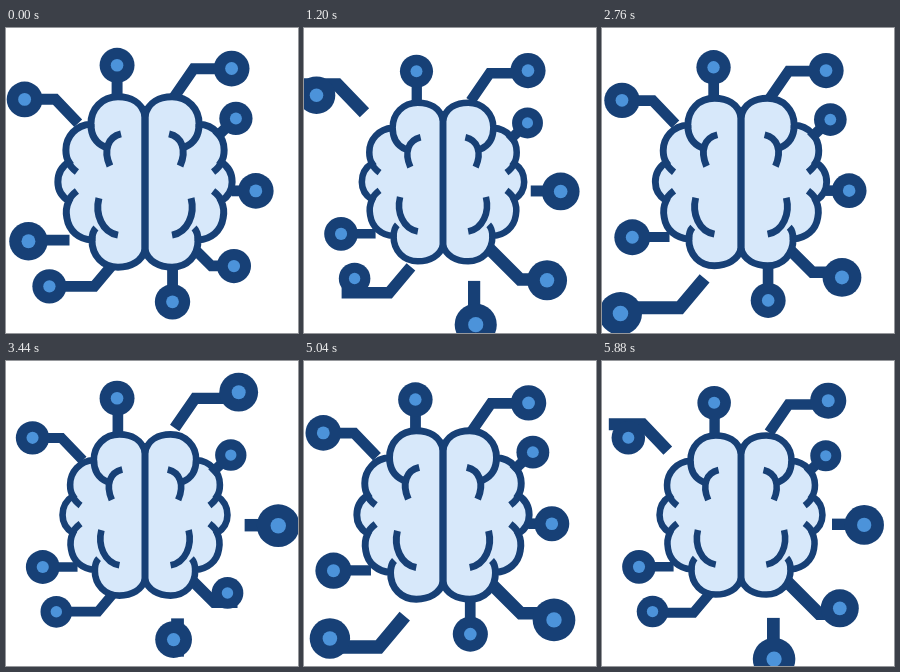
Recreate the animation shown at these times as an HTML page with a canvas. Size 292 by 305 pixels, loop 5.92 s.

```html
<!DOCTYPE html>
<html lang="en">
<head>
<meta charset="utf-8">
<title>Pulsing brain network</title>
<style>
  html, body { margin: 0; width: 100%; height: 100%; overflow: hidden; background: #fff; }
  canvas { display: block; }
</style>
</head>
<body>
<canvas id="stage" width="292" height="305"></canvas>
<script>
const ctx = document.getElementById('stage').getContext('2d');
const DARK = '#174076', MID = '#4c93da', LIGHT = '#d7e8fa';
const LOOP = 5920, CYCLE = 2360;
const LEAD = 55;      // a line moves this much before its disc
const ATTACK = 130;   // time from the start of a pulse to its peak
const BREATH = .036;  // slow swell shared by all parts
const CX = 139, CY = 154;

const brain = { rest: .964, pulses: [[740, .065], [1790, .08]] };

// r: disc radius; line: points from the disc towards the brain, relative to the centre;
// rest: resting scale; pulses: [start, strength]
const nodes = [
  { r: 18, line: [[-121, -83], [-90, -83], [-67, -59]],
    rest: .963, pulses: [[1155, .26], [1815, -.135]] },
  { r: 17.5, line: [[-28, -117], [-28, -84]],
    rest: .96, pulses: [[794, .165], [1790, .08]] },
  { r: 18, line: [[87, -114], [49, -114], [29, -85]],
    rest: .957, pulses: [[850, .23], [1764, .152]] },
  { r: 17, line: [[93, -65], [73, -46]],
    rest: .94, pulses: [[740, .06], [1790, .08]] },
  { r: 18, line: [[112, 9], [88, 9]],
    rest: .945, pulses: [[930, .285], [1890, .125]] },
  { r: 17.5, line: [[91, 86], [68, 86], [38, 56]],
    rest: .94, pulses: [[130, .3], [1090, .245], [1790, .06]] },
  { r: 18, line: [[28, 122], [28, 89]],
    rest: .95, pulses: [[1040, .268], [1815, -.115]] },
  { r: 17.5, line: [[-98, 107], [-52, 107], [-31, 82]],
    rest: .938, pulses: [[255, .275], [1205, .255], [1790, .075]] },
  { r: 19.5, line: [[-118, 60], [-78, 60]],
    rest: .9, pulses: [[1815, -.11], [2080, .12]] }
];
const bent = nodes.filter(n => n.line.length > 2);
const straight = nodes.filter(n => n.line.length === 2);

const lobe = new Path2D(`M139 88 C136 74 124 69 112 69 C96 69 85 81 85 96
  C70 97 60 109 60 122 C60 127 61 131 63 134 C55 139 52 147 52 154
  C52 161 55 168 63 173 C60 179 60 185 61 190 C63 203 73 211 86 212
  C86 228 97 239 112 239 C125 239 136 233 139 222`);
const folds = new Path2D(`M85 96 C85 107 90 115 99 119 M115 106 C102 109 97 122 104 138
  M62 133 C64 138 67 141 71 144 M62 174 C64 169 67 166 71 163
  M93 170 C89 186 96 204 112 207 M86 213 C86 207 87 203 90 200`);

// Quick rise to 1 at ATTACK, then a slower fade
function pulse(age) {
  const x = age / ATTACK;
  return (x * Math.exp(1 - x)) ** 2;
}

function scaleAt({ rest, pulses }, t) {
  const swell = BREATH * Math.cos(2 * Math.PI * (t - 40) / CYCLE);
  return pulses.reduce(
    (k, [start, strength]) => k + strength * pulse((t - start + CYCLE) % CYCLE),
    rest + swell);
}

function scaled(k, draw) {
  ctx.save();
  ctx.translate(CX, CY);
  ctx.scale(k, k);
  draw();
  ctx.restore();
}

function disc(x, y, r, color) {
  ctx.fillStyle = color;
  ctx.beginPath();
  ctx.arc(x, y, r, 0, 2 * Math.PI);
  ctx.fill();
}

function drawBrain() {
  ctx.lineWidth = 7;
  ctx.fillStyle = LIGHT;
  for (const side of [1, -1]) {
    ctx.save();
    ctx.scale(side, 1);
    ctx.translate(-CX, -CY);
    ctx.fill(lobe);
    ctx.stroke(lobe);
    ctx.stroke(folds);
    ctx.restore();
  }
  ctx.fillStyle = DARK;
  ctx.fillRect(-3.7, -76, 7.4, 152);
}

function drawLine({ line }) {
  ctx.lineWidth = 11;
  ctx.beginPath();
  line.forEach(([x, y]) => ctx.lineTo(x, y));
  ctx.stroke();
}

function drawDisc({ line: [[x, y]], r }) {
  disc(x, y, r, DARK);
  disc(x, y, r * .36, MID);
}

function drawAll(list, t, draw) {
  for (const n of list) scaled(scaleAt(n, t), () => draw(n));
}

function frame(now) {
  const t = (now % LOOP) % CYCLE;
  ctx.fillStyle = '#fff';
  ctx.fillRect(0, 0, 292, 305);
  ctx.strokeStyle = DARK;
  drawAll(bent, t + LEAD, drawLine);
  scaled(scaleAt(brain, t), drawBrain);
  drawAll(straight, t + LEAD, drawLine);
  drawAll(nodes, t, drawDisc);
}

const start = performance.now();
(function tick() {
  frame(performance.now() - start);
  requestAnimationFrame(tick);
})();
</script>
</body>
</html>
```
